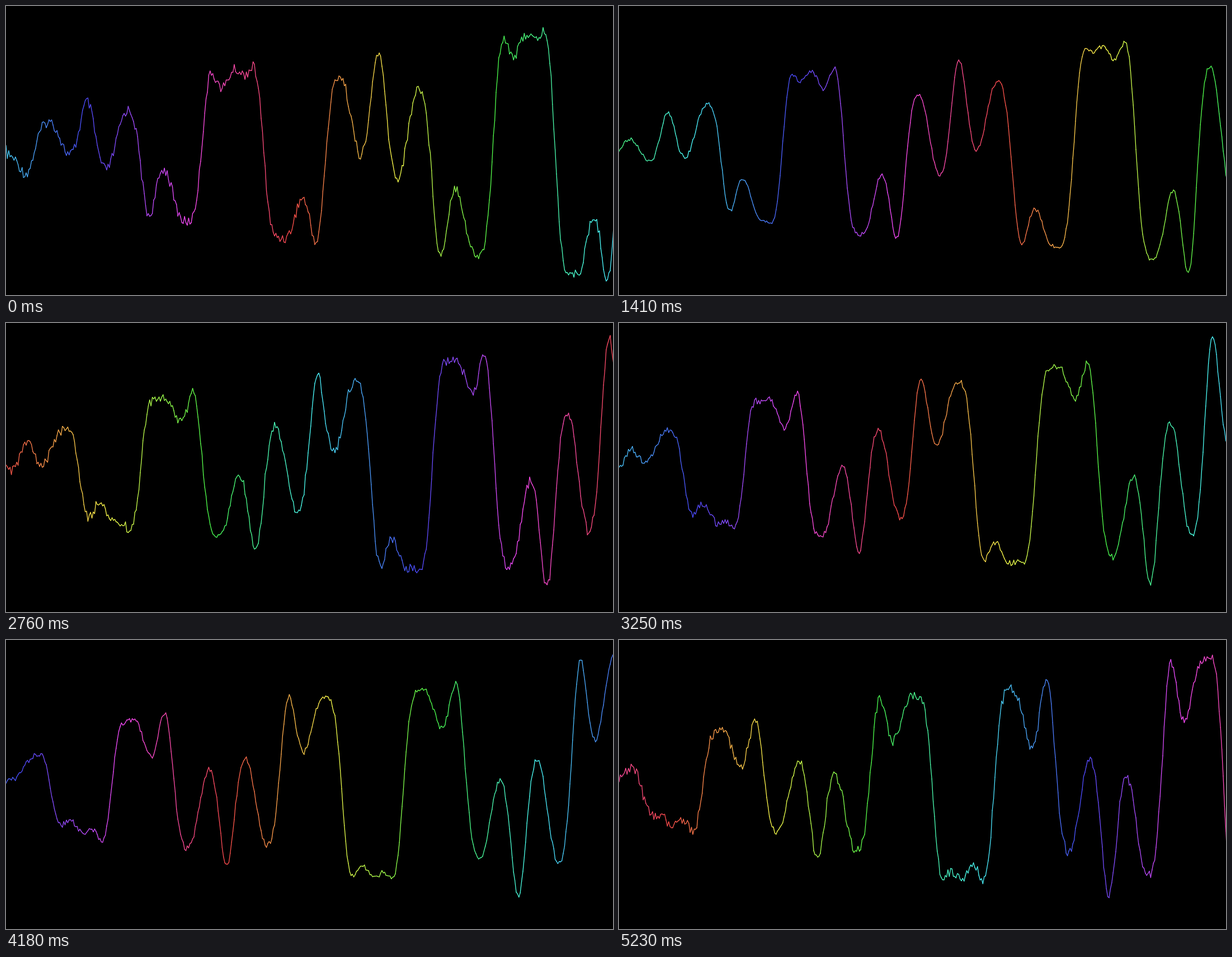
Write an HTML page with a canvas that moves like this. It is 1085 by 516 pixels and loops after 5.33 s.

```html
<!DOCTYPE html>
<html lang="en">
<head>
<meta charset="utf-8">
<title>Rainbow wave</title>
<style>
  html, body { margin: 0; width: 100%; height: 100%; overflow: hidden; background: #000; }
  canvas { display: block; }
</style>
</head>
<body>
<canvas id="stage" width="1085" height="516"></canvas>
<script>
const W = 1085, H = 516, LOOP = 5330, STEP = 2.4, TAU = 2 * Math.PI;
const ctx = document.getElementById('stage').getContext('2d');

// The picture holds between ticks; two of the holds are longer.
const HOLD = 134.4, EXTRA = 60, LONG_HOLDS = [1, 20];
const ticks = [];
for (let t = 0; t < LOOP; t += HOLD) {
  if (LONG_HOLDS.includes(ticks.length - 1)) t += EXTRA;
  ticks.push(t);
}

// Repeatable random value from -1 to 1
function noise(i, seed) {
  const s = Math.sin(i * 12.9898 + seed * 78.233) * 43758.5453;
  return 2 * (s - Math.floor(s)) - 1;
}

function draw(tick) {
  // The wave clock runs a little ahead of time in the first half.
  const u = ticks[tick] / LOOP;
  const clock = ticks[tick] + 750 * u * (1 - u) ** 2;

  // Jitter and swell take turns.
  const pulse = Math.cos(TAU * (clock - 200) / 2400);
  const jitter = 6.5 + 3 * pulse;
  const swell = 0.075 - 0.04 * pulse;
  const carrier = 271 - 0.0333 * clock;
  const modulator = 250 - 0.04 * clock;

  const yAt = i => {
    const x = i * STEP;
    const gain = 1 + swell * Math.cos(TAU * (x - 250) / 1050);
    const phase = 0.02412 * (x - carrier)
      + 1.06 * gain * Math.sin(0.0603 * (x - modulator));
    return H / 2 + 7 * gain * Math.sqrt(x) * Math.cos(phase)
      + jitter * noise(i, tick);
  };

  ctx.fillStyle = '#000';
  ctx.fillRect(0, 0, W, H);
  ctx.lineWidth = 1.3;
  ctx.lineCap = 'round';
  let y = yAt(0);
  for (let i = 0; i * STEP < W; i++) {
    const next = yAt(i + 1);
    const hue = (195 + 0.4394 * clock + 0.325 * i * STEP) % 360;
    ctx.strokeStyle = `hsl(${hue}, 100%, 65%)`;
    ctx.beginPath();
    ctx.moveTo(i * STEP, y);
    ctx.lineTo((i + 1) * STEP, next);
    ctx.stroke();
    y = next;
  }
}

let shown = -1;
const start = performance.now();
function loop() {
  const time = (performance.now() - start) % LOOP;
  const tick = ticks.filter(t => t <= time).length - 1;
  if (tick !== shown) draw(shown = tick);
  requestAnimationFrame(loop);
}
loop();
</script>
</body>
</html>
```
